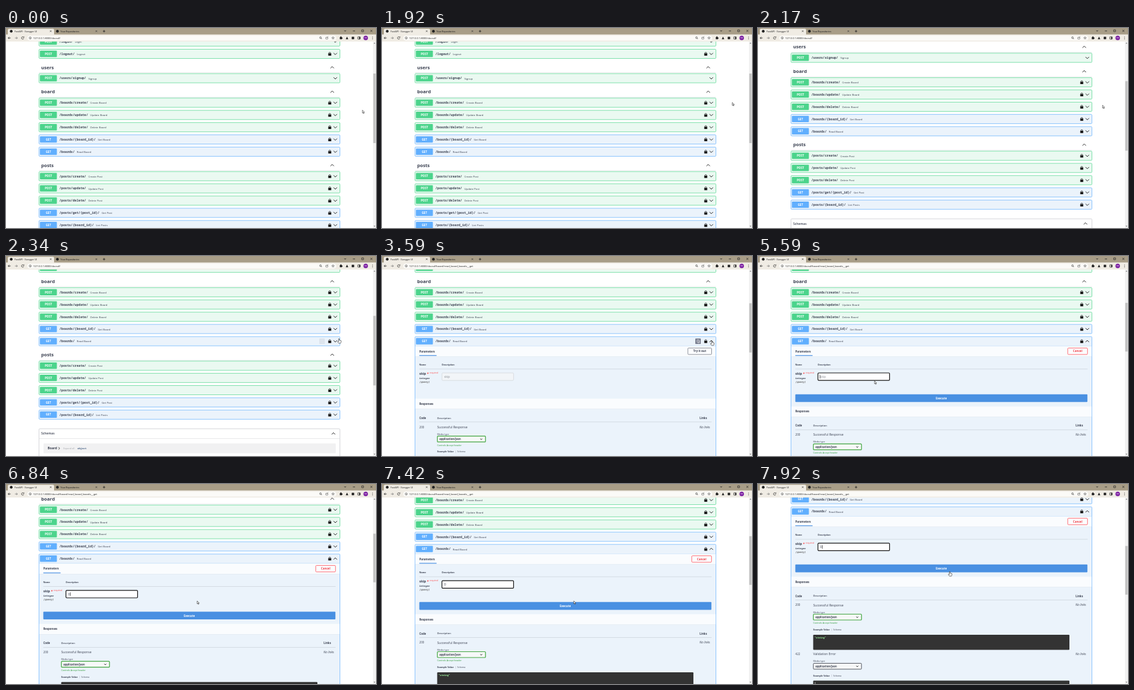
Recreate the animation shown at these times as an HTML page with a canvas. Size 600 by 325 pixels, loop 8000 ms.

```html
<!DOCTYPE html>
<html lang="en">
<head>
<meta charset="utf-8">
<style>
html, body { margin: 0; width: 600px; height: 325px; overflow: hidden; background: #fff; }
canvas { display: block; }
</style>
</head>
<body>
<canvas id="stage" width="600" height="325"></canvas>
<script>
const ctx = document.getElementById('stage').getContext('2d');
const LOOP = 8000, STEP = 1000 / 12;
const SANS = '"Open Sans", sans-serif', UI = 'Roboto, sans-serif', MONO = '"Noto Sans Mono", monospace';
const INK = '#3b4151', GREEN = '#4cd48c', BLUE = '#61affe';
const LEFT = 53.5, RIGHT = 541.5;

// Moments of the visitor's actions, in ms
const OPEN = 3050, TRY = 4130, FOCUS = 5150, TYPE = 5830;

const pointerPath = [
  [0, 578, 133.5], [80, 575.5, 134], [410, 575.2, 134], [500, 574.5, 134.3], [660, 574.5, 134.3],
  [1420, 570, 124.5], [1910, 568, 121], [2080, 566, 122], [2330, 540, 134.5], [2700, 535, 138],
  [3660, 535, 138], [3950, 516, 154], [4330, 516, 154], [5000, 176, 197], [5250, 176, 197],
  [5580, 189, 203], [6250, 189, 203], [6830, 310, 190], [7410, 311, 190], [7830, 311, 142.5], [8000, 311, 142.5]
];
const scrollPath = [
  [0, 0], [2000, 0], [2320, 62.5], [6700, 62.5], [6950, 93.75], [7330, 93.75],
  [7416, 95.4], [7560, 125], [7820, 156.4], [8000, 156.4]
];

const sections = [
  { rows: [['POST', '/login/', 'Login', 22], ['POST', '/logout/', 'Logout', 42, 1]] },
  { name: 'users', y: 64, rows: [['POST', '/users/signup/', 'Signup', 81.6]] },
  { name: 'board', y: 103.7, rows: [
    ['POST', '/boards/create/', 'Create Board', 121.4, 1], ['POST', '/boards/update/', 'Update Board', 141.3, 1],
    ['POST', '/boards/delete/', 'Delete Board', 161.2, 1], ['GET', '/boards/{board_id}/', 'Get Board', 181.1, 1],
    ['GET', '/boards/', 'Read Board', 201, 1]] },
  { name: 'posts', y: 223, rows: [
    ['POST', '/posts/create/', 'Create Post', 240.8, 1], ['POST', '/posts/update/', 'Update Post', 260.6, 1],
    ['POST', '/posts/delete/', 'Delete Post', 280.5, 1], ['GET', '/posts/get/{post_id}/', 'Get Post', 300.4, 1],
    ['GET', '/posts/{board_id}/', 'List Posts', 320.3, 1]] }
];

function along(path, t, column = 1) {
  const i = Math.max(1, path.findIndex(p => p[0] > t));
  const a = path[i - 1], b = path[i];
  const u = (t - a[0]) / (b[0] - a[0]);
  return a[column] + (b[column] - a[column]) * u * u * (3 - 2 * u);
}

function text(str, x, y, size, { color = INK, weight = 400, font = SANS, align = 'left', style = '' } = {}) {
  ctx.font = `${style} ${weight} ${size}px ${font}`;
  ctx.fillStyle = color;
  ctx.textAlign = align;
  ctx.textBaseline = 'alphabetic';
  ctx.fillText(str, x, y + size * 0.35);
}
const bold = (str, x, y, size, opts = {}) => text(str, x, y, size, { weight: 700, ...opts });

function rect(x, y, w, h, color) {
  ctx.fillStyle = color;
  ctx.fillRect(x, y, w, h);
}

function box(x, y, w, h, r, fill, stroke, width = 0.7) {
  ctx.beginPath();
  ctx.roundRect(x, y, w, h, r);
  if (fill) { ctx.fillStyle = fill; ctx.fill(); }
  if (stroke) { ctx.strokeStyle = stroke; ctx.lineWidth = width; ctx.stroke(); }
}

function line(points, color = '#222', width = 0.8) {
  ctx.beginPath();
  points.forEach(([x, y]) => ctx.lineTo(x, y));
  ctx.strokeStyle = color;
  ctx.lineWidth = width;
  ctx.stroke();
}

function circle(x, y, r, fill, stroke, start = 0, end = 7) {
  ctx.beginPath();
  ctx.arc(x, y, r, start, end);
  if (fill) { ctx.fillStyle = fill; ctx.fill(); }
  if (stroke) { ctx.strokeStyle = stroke; ctx.lineWidth = 0.7; ctx.stroke(); }
}

function shape(points, fill, stroke) {
  ctx.beginPath();
  points.forEach(([x, y]) => ctx.lineTo(x, y));
  ctx.closePath();
  ctx.fillStyle = fill;
  ctx.fill();
  if (stroke) { ctx.strokeStyle = stroke; ctx.lineWidth = 0.6; ctx.stroke(); }
}

// dir 1 points down, -1 points up
function chevron(x, y, dir, w = 2.8) {
  const h = w * 0.5 * dir;
  line([[x - w, y - h], [x, y + h], [x + w, y - h]], '#222', 0.95);
}

function lock(x, y) {
  rect(x - 2.4, y - 0.8, 4.8, 3.7, '#111');
  circle(x, y - 0.9, 1.6, null, '#111', Math.PI, 2 * Math.PI);
}

function endpoint([method, path, summary, y, locked], { open = false, copy = 0 } = {}) {
  const get = method === 'GET', color = get ? BLUE : GREEN;
  const height = open ? 520 : 15;
  box(LEFT, y - 7.5, RIGHT - LEFT, height, 1.3, get ? '#ebf3fb' : '#eaf9f1', color);
  box(55, y - 5.2, 27.5, 10.4, 1, color);
  bold(method, 68.8, y, 4.6, { color: '#fff', align: 'center' });
  bold(path, 86.5, y, 5.18, { font: MONO, weight: 600 });
  text(summary, 89.9 + path.length * 3.11, y + 0.4, 4.3);
  if (copy) {
    ctx.globalAlpha = copy;
    box(508, y - 4.6, 9, 9.2, 1, '#7d8293');
    box(511, y - 2.2, 3, 3.8, 0.4, null, '#fff', 0.6);
    line([[512, y + 2.6], [515, y + 2.6], [515, y - 1]], '#fff', 0.5);
    ctx.globalAlpha = 1;
  }
  if (locked) lock(525, y);
  chevron(534, y, open ? -1 : 1);
}

function rule(y, color = '#c4cbd3') { rect(60.5, y, 474, 0.6, color); }

function band(title, y, top, bottom) {
  rect(LEFT + 0.4, top, RIGHT - LEFT - 0.8, bottom - top, '#fafcfe');
  rect(LEFT + 0.4, bottom, RIGHT - LEFT - 0.8, 0.5, '#dde4ec');
  bold(title, 60.5, y, 4.35);
}

function button(label, x, y, w, color, border) {
  box(x, y - 5.2, w, 10.4, 1.2, '#fcfdff', border, 0.9);
  bold(label, x + w / 2, y, 4.6, { color, align: 'center' });
}

function response(code, title, y, accepts) {
  const extra = accepts ? 0 : -5.5;
  text(code, 60.5, y, 4.6);
  text(title, 89.5, y, 5.1);
  text('No links', 515, y, 4.8, { style: 'italic' });
  text('Media type', 89.5, y + 11.5, 3.7);
  box(89.8, y + 14.7, 78, 9.5, 1, '#f7f8f8', accepts ? '#41a53f' : '#41444e', accepts ? 1.2 : 0.9);
  bold('application/json', 93, y + 19.6, 4.3);
  chevron(161, y + 19.6, 1, 1.6);
  if (accepts) text('Controls Accept header', 89.5, y + 29.3, 3.65, { color: '#2e9a36' });
  const ex = y + 40.2 + extra;
  bold('Example Value', 89.5, ex, 3.7);
  rect(119.6, ex - 2, 0.4, 4, '#aab');
  text('Schema', 122, ex, 3.6);
  box(89.5, ex + 8, 415.5, accepts ? 24.5 : 90, 1.2, '#333');
  if (accepts) bold('"string"', 91.5, ex + 12.7, 3.9, { color: '#a2fca2', font: MONO });
  else bold('{', 91.5, ex + 12.7, 3.9, { color: '#fff', font: MONO });
}

function operationBody(y, t) {
  const trying = t >= TRY, focused = t >= FOCUS, typed = t >= TYPE;
  rect(LEFT, y + 7.4, RIGHT - LEFT, 0.6, '#9fcbf8');
  band('Parameters', y + 16.6, y + 8, y + 24.7);
  rect(60.5, y + 22.6, 28, 1.2, '#4990e2');
  if (trying) button('Cancel', 502.3, y + 16.3, 32, '#f03e46', '#ff6068');
  else button('Try it out', 496, y + 16.3, 38.5, INK, '#82868f');

  bold('Name', 60.5, y + 38.6, 3.7);
  bold('Description', 97, y + 38.6, 3.6);
  rule(y + 45);
  bold('skip', 60.5, y + 52.6, 5.3);
  bold('*', 73, y + 52.8, 5, { color: '#f33' });
  text('required', 77.3, y + 51.5, 3.4, { color: '#f44' });
  bold('integer', 60.5, y + 60, 4.05, { font: MONO });
  bold('(query)', 60.5, y + 66, 4.05, { font: MONO, style: 'italic', color: '#666' });

  box(97.2, y + 51.5, 116.2, 12.2, 1.4, trying ? '#fff' : '#f2f5f8',
    focused ? '#151515' : '#d3d7db', focused ? 1.2 : 0.8);
  text(typed ? '0' : 'skip', 100.7, y + 57.7, 5.1, { color: typed ? INK : '#8e9299' });
  const blinkStart = typed ? TYPE : FOCUS;
  if (focused && (t - blinkStart) % 1000 < 500) rect(typed ? 103.9 : 100.2, y + 54.6, 0.6, 6.2, '#111');

  if (trying) {
    box(60.5, y + 86.2, 473.7, 12.6, 1, '#4990e2');
    bold('Execute', 297.3, y + 92.6, 4.6, { color: '#fff', align: 'center' });
  }

  const r = y + (trying ? 114.4 : 101.7);
  band('Responses', r, r - 8.4, r + 8.3);
  bold('Code', 60.5, r + 23, 4.4);
  text('Description', 89.5, r + 23, 4, { weight: 600 });
  bold('Links', 515, r + 23, 4.5);
  rule(r + 29.3);
  response('200', 'Successful Response', r + 37.8, true);
  response('422', 'Validation Error', r + 117.7, false);
}

function schemas() {
  box(LEFT, 343.3, RIGHT - LEFT, 120, 1.3, '#fff', '#c3c5ca');
  text('Schemas', 57, 351, 5.1, { weight: 600 });
  chevron(531, 351, -1);
  rect(LEFT, 359, RIGHT - LEFT, 0.6, '#d5d7da');
  box(60.8, 367, 474, 16, 1.2, '#f1f1f2');
  bold('Board', 67.5, 375, 5.2);
  line([[85.2, 373.2], [87, 375], [85.2, 376.8]], '#222', 0.9);
  text('Expand all', 93, 375.3, 3.75, { color: '#a3a5aa' });
  bold('object', 116, 375.2, 4, { font: MONO, color: '#3f5a7f' });
}

function page(t, scroll) {
  const open = t >= OPEN;
  const hover = t < 2300 || t > TRY - 330 ? 0 : Math.min(1, 0.12 + (t - 2330) / 300);
  ctx.save();
  ctx.translate(0, -scroll);
  for (const { name, y, rows } of sections) {
    if (open && name === 'posts') break;
    if (name) {
      bold(name, 57, y, 7.6);
      chevron(529, y, -1);
      rect(LEFT, y + 8.4, RIGHT - LEFT, 0.6, '#dcdee2');
    }
    for (const row of rows) {
      const target = row[1] === '/boards/';
      endpoint(row, { open: open && target, copy: target ? hover : 0 });
    }
  }
  if (open) operationBody(201, t);
  else schemas();
  ctx.restore();
}

function scrollbar(t, scroll) {
  const height = t < OPEN ? 783 : t < TRY ? 1106 : 1119;
  const unit = 292 / height;
  rect(595, 22, 5, 303, '#f1f1f1');
  rect(595.6, 27 + (126 + scroll) * unit, 3.8, 303 * unit, '#c1c1c1');
  shape([[596.2, 25.3], [597.5, 23.8], [598.8, 25.3]], '#555');
  shape([[596.2, 321.5], [597.5, 323], [598.8, 321.5]], '#555');
}

function cross(x, y, r, color = '#333') {
  line([[x - r, y - r], [x + r, y + r]], color, 0.7);
  line([[x - r, y + r], [x + r, y - r]], color, 0.7);
}

function browser(t) {
  rect(0, 0, 600, 11, '#a89d87');
  rect(0, 10.5, 600, 11.5, '#f0ece4');
  box(3, 1.2, 75, 11, 2, '#f0ece4');
  circle(8.5, 5.2, 2.2, '#222');
  text('FastAPI - Swagger UI', 13.8, 5.3, 3.9, { font: UI, color: '#333' });
  cross(72.5, 5.2, 1.2);
  circle(83.4, 5.2, 2.2, '#222');
  text('Your Repositories', 88.2, 5.3, 3.9, { font: UI, color: '#222' });
  cross(146.5, 5.2, 1.2);
  line([[157, 5.2], [161, 5.2]]);
  line([[159, 3.2], [159, 7.2]]);
  chevron(550, 4.6, 1, 1.4);
  line([[562.5, 4.8], [566, 4.8]]);
  box(576.8, 3, 3, 3, 0, null, '#222');
  cross(592.5, 4.6, 1.6, '#222');

  line([[7.5, 16.2], [3.5, 16.2]]);
  line([[5.3, 14.4], [3.5, 16.2], [5.3, 18]]);
  line([[14.5, 16.2], [18.5, 16.2]], '#777');
  line([[16.7, 14.4], [18.5, 16.2], [16.7, 18]], '#777');
  circle(27, 16.2, 1.9, null, '#222', 0.3, 5.6);
  shape([[27.6, 15.4], [29.4, 15.4], [29.4, 13.6]], '#222');

  box(34.5, 12.2, 501, 8.2, 4.1, '#fbfaf7');
  circle(39.3, 16.2, 1.7, null, '#555');
  rect(39, 15.8, 0.6, 1.5, '#555');
  text('127.0.0.1:8000/docs#/' + (t < OPEN ? '' : 'board/read_board_boards__get'), 44.2, 16.3, 4.3, { font: UI, color: '#333' });

  circle(510, 15.7, 1.4, null, '#444');
  line([[511, 16.7], [512.3, 18]], '#444');
  box(518.6, 15, 3.3, 3, 0.3, null, '#555', 0.6);
  line([[520, 16], [522.5, 13.8]], '#555', 0.6);
  shape(Array.from({ length: 10 }, (_, i) => {
    const r = i % 2 ? 1 : 2.2, a = i * Math.PI / 5 - Math.PI / 2;
    return [530.3 + r * Math.cos(a), 16.2 + r * Math.sin(a)];
  }), '#fbfaf7', '#555');
  box(541.3, 14.7, 3.6, 3.6, 0.6, '#222');
  circle(543.1, 14.5, 0.9, '#222');
  circle(544.9, 16.4, 0.9, '#222');
  shape([[551, 18.2], [553, 13.9], [555, 18.2]], '#222');
  box(560.6, 14.3, 4, 3.9, 0.4, '#222');
  box(570.5, 14.3, 3.8, 3.8, 0.3, null, '#222');
  rect(572.6, 14.3, 1.7, 3.8, '#222');
  circle(583.3, 16.2, 3.6, '#7b1fa2');
  text('me', 583.3, 16.2, 3, { font: UI, color: '#fff', align: 'center' });
  for (const y of [14.3, 16.2, 18.1]) circle(594.3, y, 0.5, '#333');
}

function pointer(t) {
  const x = along(pointerPath, t), y = along(pointerPath, t, 2);
  const at = pts => pts.map(([dx, dy]) => [x + dx, y + dy]);
  const hand = (t > 2250 && t < 4400) || t > 7430;
  const beam = t > 4900 && t < 5400;
  if (hand) {
    shape(at([[-0.7, 0], [0.5, 0], [0.7, 2.4], [3.3, 3.1], [3.5, 5], [2.7, 7.2], [-0.5, 7.2], [-2.5, 4.6], [-1.8, 3.9], [-0.7, 4.7]]), '#fff', '#222');
  } else if (beam) {
    line(at([[0, -2.6], [0, 2.6]]), '#222', 0.6);
    line(at([[-1, -2.6], [1, -2.6]]), '#222', 0.5);
    line(at([[-1, 2.6], [1, 2.6]]), '#222', 0.5);
  } else {
    shape(at([[0, 0], [0, 4.8], [1.1, 3.8], [1.9, 5.5], [2.7, 5.1], [1.9, 3.5], [3.3, 3.4]]), '#fff', '#222');
  }
}

function draw(now) {
  const t = Math.floor((now % LOOP) / STEP) * STEP;
  const scroll = along(scrollPath, t);
  rect(0, 0, 600, 325, '#fff');
  page(t, scroll);
  scrollbar(t, scroll);
  browser(t);
  pointer(t);
}

let start;
function frame(now) {
  start ??= now;
  draw(now - start);
  requestAnimationFrame(frame);
}
requestAnimationFrame(frame);
</script>
</body>
</html>
```
